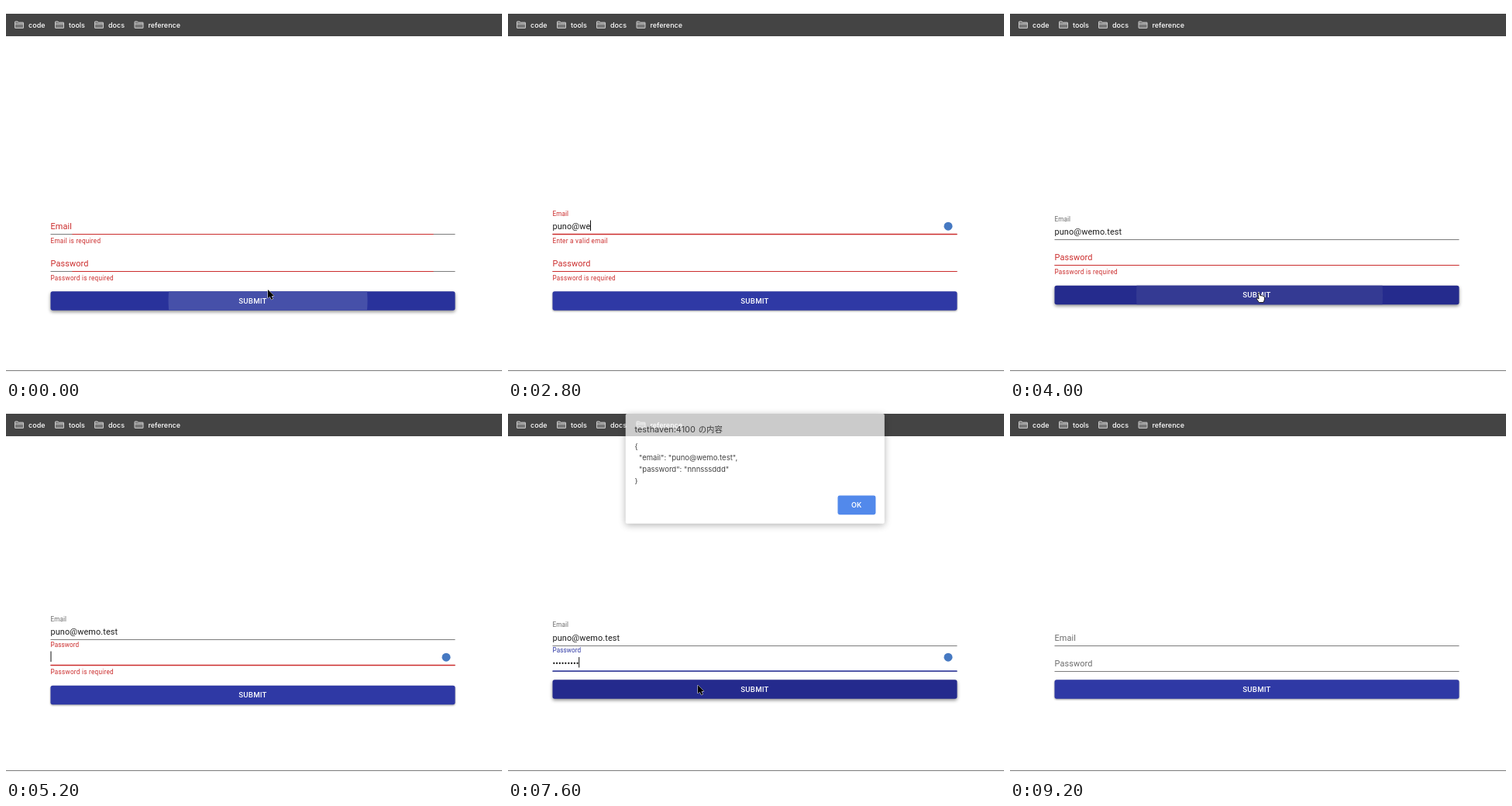
These frames come from a looping animation (640 px wide and 480 px high, 9.6 s). An HTML page:

```html
<!DOCTYPE html>
<html lang="en">
<head>
<meta charset="utf-8">
<title>Login form validation</title>
<style>
  html, body { margin: 0; width: 100%; height: 100%; overflow: hidden; background: #fff; }
  svg { display: block; width: 100vw; height: 100vh; }
  text { white-space: pre; }
  .bar { font: 500 9px Inter, sans-serif; fill: #fff; }
  .input { font: 10.9px Roboto, sans-serif; letter-spacing: .00938em; }
  .small { font: 8.17px Roboto, sans-serif; letter-spacing: .00938em; }
  .help { letter-spacing: .0333em; }
  .submit { font: 500 9.55px Roboto, sans-serif; letter-spacing: .02857em; fill: #fff; text-anchor: middle; }
  .title { font: 11px Inter, "Noto Sans CJK JP", "Noto Sans CJK", sans-serif; fill: #222; }
  .cjk { font: 10.5px "Noto Sans CJK JP", "Noto Sans CJK", sans-serif; }
  .body { font: 9.6px Inter, sans-serif; fill: #222; }
  .ok { font: 600 9px Inter, sans-serif; fill: #fff; text-anchor: middle; }
</style>
</head>
<body>
<svg id="stage" viewBox="0 0 640 480" xmlns="http://www.w3.org/2000/svg">
  <rect width="640" height="480" fill="#fff"/>
  <rect y="10" width="640" height="29" fill="#444"/>
  <g id="bookmarks"></g>
  <rect y="470" width="640" height="1" fill="#7b7b7b"/>
  <g id="scene"></g>
</svg>
<script>
const STEP = 400, STEPS = 24;
const LEFT = 57.5, RIGHT = 579.5, MID = (LEFT + RIGHT) / 2;
const RED = '#cb2c2c', BLUE = '#2f39a5', GREY = '#6c6c6c', INK = '#1c1c1c';
const MAIL = 'puno@wemo.test', SECRET = 'nnnsssddd';

const normal = { fill: BLUE, shadow: '0 1.5px 1.2px rgba(0,0,0,.4)' };
const pressed = (fill, ripple) => ({ fill, ripple, shadow: '0 2px 2px rgba(0,0,0,.45)' });
const dots = n => '•'.repeat(n);

// Each entry changes part of the state from its step onward.
const timeline = [
  [0, { mail: '', pass: '', mailErr: 'Email is required', passErr: 'Password is required',
        focus: '', spread: .893, dialog: 0, cursor: ['arrow', 338, 366],
        button: pressed('#29329b', { x: 338, r: 128.5, fill: '#4650a9' }) }],
  [1, { spread: 1, cursor: null, button: normal }],
  [2, { focus: 'mail' }],
  [6, { mail: MAIL.slice(0, 1), mailErr: 'Enter a valid email' }],
  [7, { mail: MAIL.slice(0, 7) }],
  [8, { mail: MAIL, mailErr: '' }],
  [10, { focus: '', cursor: ['hand', 322, 370],
         button: pressed('#252b8d', { x: 322, r: 159, fill: '#343a93' }) }],
  [11, { cursor: null, button: normal }],
  [12, { focus: 'pass' }],
  [15, { pass: dots(1), passErr: 'Password should be of minimum 8 characters length' }],
  [17, { pass: dots(6) }],
  [18, { pass: dots(SECRET.length), passErr: '' }],
  [19, { dialog: .72, cursor: ['arrow', 245, 360], button: pressed('#242a8d') }],
  [20, { dialog: 1 }],
  [21, { cursor: ['arrow', 429, 159] }],
  [22, { dialog: 0, cursor: null }],
  [23, { mail: '', pass: '', focus: '', button: normal }]
];

const scene = document.getElementById('scene');

const text = (cls, x, y, value, fill) =>
  `<text class="${cls}" x="${x}" y="${y}"${fill ? ` fill="${fill}"` : ''}>${value}</text>`;

const line = (x1, x2, y, color, width) =>
  `<path d="M${x1} ${y}H${x2}" stroke="${color}" stroke-width="${width}"/>`;

function field(label, value, error, focused, y, spread, badgeY) {
  const tone = error ? RED : focused ? BLUE : GREY;
  const thin = Math.floor(y) + .5;
  const half = (RIGHT - LEFT) / 2 * spread;
  let out = focused || value
    ? text('small', LEFT, y - 24, label, tone)
    : text('input', LEFT, y - 6.5, label, tone);
  out += line(LEFT, RIGHT, thin, '#7c7c7c', 1);
  if (focused) out += line(LEFT, RIGHT, y, tone, 1.6);
  else if (error) out += line(MID - half, MID + half, thin, RED, 1);
  if (error) out += text('small help', LEFT, y + 11.5, error, RED);
  if (value) out += `<text class="input${focused ? ' typed' : ''}" x="${LEFT}" y="${y - 6.5}" fill="${INK}">${value}</text>`;
  if (focused) {
    out += `<rect class="caret" x="${LEFT}" y="${y - 18}" width="1" height="13.5" fill="#111"/>`;
    out += `<circle cx="568" cy="${badgeY}" r="5.5" fill="#4679c2"/>`;
  }
  return out;
}

function submit({ fill, ripple, shadow }, y) {
  const box = `x="${LEFT}" y="${y}" width="${RIGHT - LEFT}" height="24.4" rx="2.7"`;
  const wave = ripple
    ? `<clipPath id="clip"><rect ${box}/></clipPath>
       <circle clip-path="url(#clip)" cx="${ripple.x}" cy="${y + 12}" r="${ripple.r}" fill="${ripple.fill}"/>` : '';
  return `<rect ${box} fill="${fill}" style="filter:drop-shadow(${shadow})"/>${wave}` +
    text('submit', MID, y + 15.6, 'SUBMIT');
}

function dialog(alpha) {
  if (!alpha) return '';
  const full = alpha === 1;
  const place = full ? '' : 'translate(3.2 -1.8) scale(.99)';
  const rows = ['{', `  "email": "${MAIL}",`, `  "password": "${SECRET}"`, '}'];
  return `<g transform="${place}">
    <rect x="150" y="12" width="337.5" height="143" rx="2" fill="#fff" opacity="${alpha}"
      style="filter:drop-shadow(0 2px 5px rgba(0,0,0,.42))"/>
    <g opacity="${full ? 1 : .85}">
      ${text('title', 162, 36, 'testhaven:4100')}
      ${text('title cjk', 245, 36, 'の内容')}
      ${rows.map((row, i) => text('body', 162, 58 + i * 15, row)).join('')}
      <rect x="426.5" y="118.5" width="49.5" height="25" rx="2.5" fill="#3475e8"/>
      ${text('ok', 451, 134.3, 'OK')}
    </g></g>`;
}

const pointers = {
  arrow: `<path d="M0 0V11L2.6 8.7L4.4 12.8L6.3 12L4.6 8H8Z" fill="#000" stroke="#fff" stroke-width="1"
    paint-order="stroke" style="filter:drop-shadow(0 .7px .6px rgba(0,0,0,.4))"/>`,
  hand: `<path d="M-2 .8Q-1-.6 0 .8L1 4Q2 3 3 4Q4 3.4 4.7 4.6Q6.4 4.2 6.4 6V9L5 12.5H-.6L-3.6 8.4
    Q-4.4 7 -3 6.8L-1 8Z" fill="#fff" stroke="#111" stroke-width=".9" stroke-linejoin="round"/>`
};

function draw(step) {
  const s = {};
  for (const [from, change] of timeline) if (from <= step) Object.assign(s, change);

  // The form is centred, so each help line pushes the button down by half its height.
  const errors = !!s.mailErr + !!s.passErr;
  const buttonY = 353.3 + 7.5 * errors;
  const passY = buttonY - 11.3 - (s.passErr ? 15 : 0);
  const mailY = passY - 33 - (s.mailErr ? 14.5 : 0);

  scene.innerHTML =
    field('Email', s.mail, s.mailErr, s.focus === 'mail', mailY, s.spread, mailY - 10.3) +
    field('Password', s.pass, s.passErr, s.focus === 'pass', passY, s.spread, 324.2) +
    submit(s.button, buttonY) +
    dialog(s.dialog) +
    (s.cursor ? `<g transform="translate(${s.cursor[1]} ${s.cursor[2]})">${pointers[s.cursor[0]]}</g>` : '');

  const typed = scene.querySelector('.typed');
  if (typed) scene.querySelector('.caret').setAttribute('x', LEFT + typed.getComputedTextLength() - .3);
}

const folder = x => `<path transform="translate(${x} 19.5)"
  d="M.5 8.5V1Q.5.5 1 .5H4L5.2 1.7H11Q11.5 1.7 11.5 2.2V8.5Q11.5 9 11 9H1Q.5 9 .5 8.5ZM.5 3.6H11.5"
  fill="#777" stroke="#d6d6d6" stroke-width=".9"/>`;

document.getElementById('bookmarks').innerHTML =
  [['code', 11], ['tools', 63], ['docs', 114], ['reference', 165.5]]
    .map(([name, x]) => folder(x) + text('bar', x + 18, 27.6, name)).join('');

let shown = -1;
function tick(now) {
  const step = Math.floor(now / STEP) % STEPS;
  if (step !== shown) draw(shown = step);
  requestAnimationFrame(tick);
}
tick(0);
</script>
</body>
</html>
```
